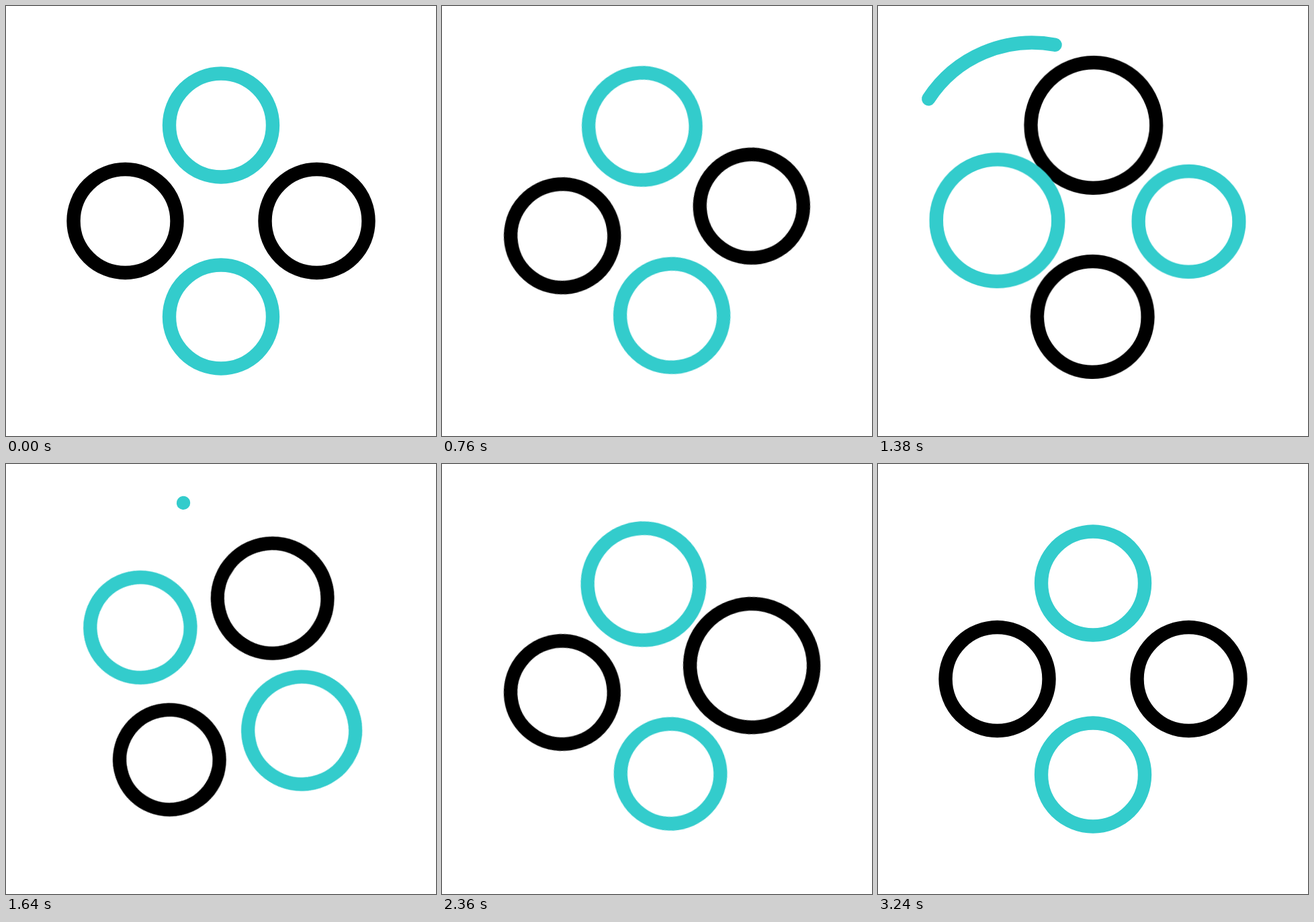
An HTML page that plays this animation: 640 by 640 pixels, repeating every 3.6 s.

```html
<!DOCTYPE html>
<html lang="en">
<head>
<meta charset="utf-8">
<title>Orbiting rings</title>
<style>
  @property --tail { syntax: "<number>"; inherits: false; initial-value: 0; }
  @property --head { syntax: "<number>"; inherits: false; initial-value: 0; }

  html, body { margin: 0; width: 100%; height: 100%; overflow: hidden; background: #fff; }
  svg { display: block; width: 100%; height: 100%; fill: none; stroke-width: 20.4; stroke-linecap: round; }
  .dark { stroke: #000; }
  .teal { stroke: #3cc; }

  .orbit { transform-origin: 320px 320px; animation: turn 3.6s infinite; }
  .orbit circle {
    r: 77px;
    animation: pulse 3.6s calc(var(--i) * 126ms) infinite backwards;
  }
  .sweep {
    stroke-dasharray: max(.01px, calc((var(--head) - var(--tail)) * 1px)) 400px;
    stroke-dashoffset: calc(var(--tail) * -1px);
    animation: head 3.6s infinite, tail 3.6s infinite, show 3.6s step-end infinite;
  }

  /* small wind-up, then half a turn clockwise */
  @keyframes turn {
    0%, 4.444% { transform: rotate(0deg); animation-timing-function: cubic-bezier(.33, 0, .67, 1); }
    16.667% { transform: rotate(-20deg); animation-timing-function: cubic-bezier(.16, 0, .348, 1); }
    79.167%, 100% { transform: rotate(180deg); }
  }
  @keyframes pulse {
    0%, 18.472% { r: 77px; animation-timing-function: cubic-bezier(.37, 0, .63, 1); }
    28.472% { r: 93.5px; animation-timing-function: cubic-bezier(.37, 0, .63, 1); }
    40.417% { r: 73.5px; animation-timing-function: cubic-bezier(.37, 0, .63, 1); }
    53.889% { r: 93.7px; animation-timing-function: cubic-bezier(.25, .15, .4, 1); }
    67.222% { r: 74px; animation-timing-function: cubic-bezier(.33, 0, .4, 1); }
    79.444%, 100% { r: 77px; }
  }
  @keyframes head {
    0%, 21.111% { --head: 0; animation-timing-function: cubic-bezier(.2, .1, .5, 1); }
    38.889%, 100% { --head: 100; }
  }
  @keyframes tail {
    0%, 31.111% { --tail: 0; animation-timing-function: cubic-bezier(.33, 0, .67, 1); }
    45.556%, 100% { --tail: 100; }
  }
  @keyframes show {
    0% { opacity: 0; }
    21.25% { opacity: 1; }
    47.222%, 100% { opacity: 0; }
  }
</style>
</head>
<body>
<svg viewBox="0 0 640 640">
  <path class="sweep teal" pathLength="100" d="M78.7 345.3A184.5 184.5 0 0 1 264 57.9"/>
  <g class="orbit">
    <circle class="dark" cx="462.5" cy="320" style="--i: 1"/>
    <circle class="dark" cx="177.5" cy="320" style="--i: 3"/>
    <circle class="teal" cx="320" cy="177.5" style="--i: 0"/>
    <circle class="teal" cx="320" cy="462.5" style="--i: 2"/>
  </g>
</svg>
</body>
</html>
```
